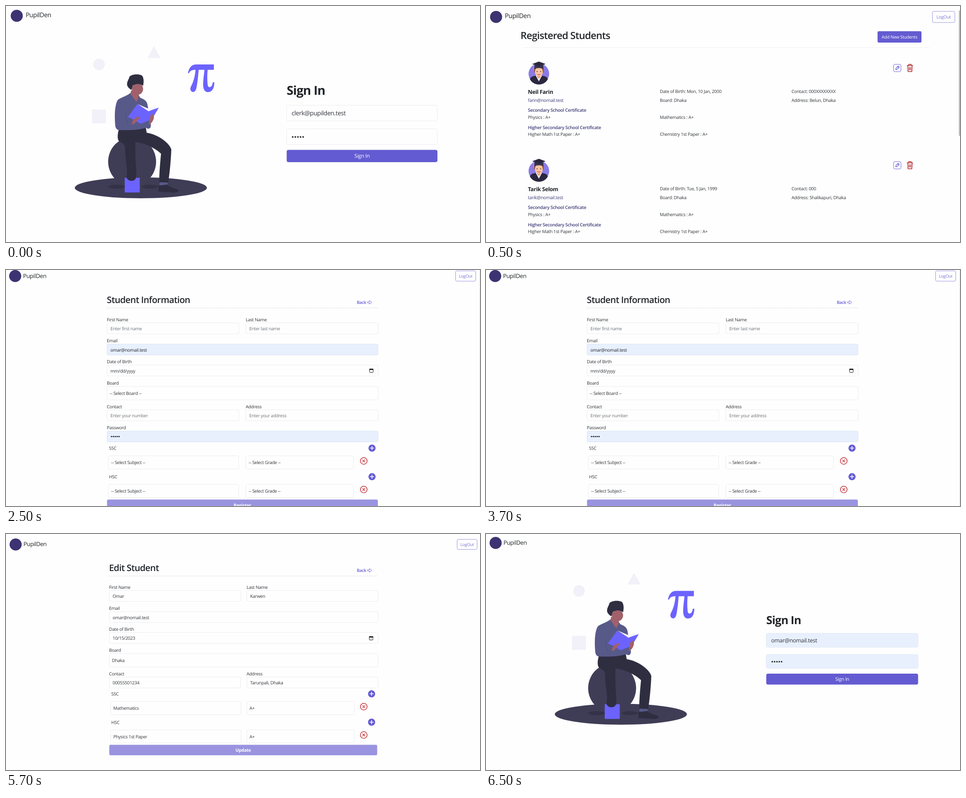
These frames come from a looping animation (1058 by 529 pixels, 8000 ms). An HTML page:

```html
<!DOCTYPE html>
<html lang="en">
<head>
<meta charset="utf-8">
<title>School admin tour</title>
<style>
  html, body { margin: 0; width: 100%; height: 100%; overflow: hidden; background: #fefefe; }
  svg { display: block; width: 1058px; height: 529px; }
  text { font-family: "Open Sans", "Noto Sans", sans-serif; letter-spacing: -.03em; white-space: pre; text-rendering: geometricPrecision; }
</style>
</head>
<body>
<svg id="stage" viewBox="0 0 1058 529"></svg>
<script>
const INK = '#212529', BODY = '#33363b', HINT = '#6c7279', NAVY = '#3f3d78',
      VIOLET = '#635bd1', PALE = '#9a94e0', FILLED = '#e8f0fe', EDGE = '#ececf0', RED = '#c43a3f';

// Drawing helpers: each returns SVG markup.
const text = (x, y, size, str, fill = BODY, weight = 400, anchor = 'start') =>
  `<text x="${x}" y="${y}" font-size="${size}" fill="${fill}" font-weight="${weight}" text-anchor="${anchor}">${str}</text>`;
const rect = (x, y, w, h, fill, stroke = 'none', r = 3) =>
  `<rect x="${x}" y="${y}" width="${w}" height="${h}" rx="${r}" fill="${fill}" stroke="${stroke}"/>`;
const circle = (x, y, r, fill, extra = '') => `<circle cx="${x}" cy="${y}" r="${r}" fill="${fill}" ${extra}/>`;
const ellipse = (x, y, rx, ry, fill) => `<ellipse cx="${x}" cy="${y}" rx="${rx}" ry="${ry}" fill="${fill}"/>`;
const path = (d, fill) => `<path d="${d}" fill="${fill}"/>`;
const line = (d, stroke, width = 1, extra = '') =>
  `<path d="${d}" fill="none" stroke="${stroke}" stroke-width="${width}" stroke-linecap="round" stroke-linejoin="round" ${extra}/>`;
const group = (x, y, body) => `<g transform="translate(${x} ${y})">${body}</g>`;
const dots = (x, y, step, r) => [0, 1, 2, 3, 4].map(i => circle(x + i * step, y, r, INK)).join('');

const brand = (cx, cy, x, y, size) => circle(cx, cy, 13.5, '#3c3372') + text(x, y, size, 'PupilDen', INK);
const logout = (x, y, w, h, size) =>
  rect(x, y, w, h, 'none', '#9a94e0') + text(x + w / 2, y + h / 2 + 3.5, size, 'LogOut', '#7a73d4', 400, 'middle');

function reader() {
  const dark = '#2f2e41', slate = '#3f3d56', cloth = '#575a89', skin = '#a0616a', blue = '#6c63ff', faint = '#f2f0f8';
  return circle(207.5, 131, 13, faint) + path('M330.5 90L345 116.5H316Z', faint) + rect(192, 232, 31, 31, faint, 'none', 0) +
    path('M406 150C409 137 415 131 424 131H464V143H450C449 155 449 166 450 176C451 182 454 183 457 181C460 179 461 175 461.5 171H465C465 184 460 193 451 193C443 193 440 186 440 176C440 165 442 154 443 143H430C429 158 427 174 425 184C423 192 419 194 415 192C410 189 411 183 414 178C419 168 422 156 423 143C415 143 411 145 408 151Z', blue) +
    ellipse(301, 407.5, 147.5, 23.5, slate) + ellipse(281.5, 349, 53.5, 55, slate) +
    ellipse(247, 405, 19, 4.5, '#343247') + ellipse(321, 405, 18, 4.5, '#343247') +
    rect(265, 385, 33.5, 33, blue, 'none', 0) +
    path('M252 276C248 290 248 302 255 305C262 308 266 312 266 320C265 345 273 365 269 383C270 394 288 395 290 385C293 372 287 345 289 305C305 306 330 316 346 331C344 352 342 375 342 395L362 396C366 370 368 345 369 322C366 308 340 288 314 284L312 272Z', dark) +
    path('M343 395L362 396L358 403L342 402Z', cloth) +
    path('M340 401C350 404 356 398 362 402C369 408 379 408 386 413C384 418 376 419 370 418L340 416Z', dark) +
    path('M279 194C268 203 256 205 250 210C242 221 242 250 244 269C245 276 250 279 255 278C275 279 295 278 313 273C319 278 325 273 323 264L316 222C315 212 306 208 300 206L295 198Z', cloth) +
    line('M268 240C266 250 270 260 273 268', '#4b4d7a') +
    path('M279 189L297 194L296 205L291 215L278 197Z', skin) + ellipse(293.5, 186, 12.5, 13, skin) +
    path('M270.5 178C269 170 274 165 275 160C277 152 302 151 305 158C308 164 307.5 172 306 179C298 173 290 174 283 178L280 188C276 186 272 182 270.5 178Z', dark) +
    path('M293 220L318 235L341 228L328 250C326 256 322 258 318 257L301 264C290 259 282 252 272 249Z', blue) +
    path('M294 220L320 231C326 226 332 225 339 228L318 236Z', '#f4f3fa') +
    path('M281 265C281 256 289 248 297 248C298 254 293 257 285 265Z', skin) +
    path('M319 264L321 250C325 240 329 242 330 247C331 254 326 261 321 266Z', skin);
}

// Sign-in form; y values are [title, first box, second box, button].
function signIn(x, w, [title, first, second, button], boxH, btnH, size, mail, bg, step) {
  const edge = bg === 'none' ? EDGE : '#e3e9f5';
  return text(x, title, size * 1.98, 'Sign In', INK, 700) +
    rect(x, first, w, boxH, bg, edge, 4) + text(x + 11, first + boxH / 2 + 5, size, mail) +
    rect(x, second, w, boxH, bg, edge, 4) + dots(x + 13.5, second + boxH / 2 + .5, step, step * .32) +
    rect(x, button, w, btnH, VIOLET, 'none', 4) +
    text(x + w / 2, button + btnH / 2 + 4, size * .85, 'Sign In', '#fff', 400, 'middle');
}

const avatar = () => circle(0, 0, 23, '#8a7be6') +
  path('M-20 12C-17 4 -10 5 0 4C10 5 17 4 20 12C16 20 8 24 0 24S-16 20 -20 12Z', '#2c2740') +
  path('M-7 4L0 17L7 4Z', '#f6f2f4') + path('M-4 2H4V7L0 11L-4 7Z', '#e5a27f') +
  path('M-10.5 -3V-13H10.5V-3Z', '#8a4836') + ellipse(0, -4.5, 9, 10.5, '#f8c4a2') +
  circle(-4, -5, 1.1, '#3a2a33') + circle(4, -5, 1.1, '#3a2a33') + line('M-3 1Q0 3.5 3 1', '#b5483f', 1.4) +
  path('M-10 -19V-11Q0 -15 10 -11V-19Z', '#3a3350') + path('M-15 -22L0 -27.5L15 -22L0 -16Z', '#2c2740') +
  line('M-12 -21V-8', '#e2a24c', 1.3);

const pencil = () => rect(.8, .8, 16.4, 16.4, 'none', '#6a62d6', 3) +
  line('M5.5 12.5L6 9.5L11 4.5L13.5 7L8.5 12Z M9.5 6L12 8.5', '#6a62d6', 1.3);
const trash = () => line('M.5 3.5H13M4 3V.8H9.5V3M2 4L2.6 17H11L11.6 4M5.3 7.5V13.5M8.3 7.5V13.5', '#b02a30', 1.6);

function student(dy, name, mail, birth, contact, address) {
  const cell = (x, y, str) => text(x, y, 10, str);
  const head = (y, str) => text(93.5, y, 10.1, str, NAVY, 600);
  return group(0, dy, group(118, 152, avatar()) + group(909, 130, pencil()) + group(939.5, 130, trash()) +
    text(93.5, 197, 12.4, name, INK, 700) + text(93.5, 214.5, 10.2, mail, NAVY) +
    cell(388, 194.5, 'Date of Birth: ' + birth) + cell(388, 214.5, 'Board: Dhaka') +
    cell(682, 194.5, 'Contact: ' + contact) + cell(682, 214.5, 'Address: ' + address + ', Dhaka') +
    head(237, 'Secondary School Certificate') + cell(93.5, 252.5, 'Physics : A+') + cell(388, 252.5, 'Mathematics : A+') +
    head(275.5, 'Higher Secondary School Certificate') + cell(93.5, 290.5, 'Higher Math 1st Paper : A+') +
    cell(388, 290.5, 'Chemistry 1st Paper : A+'));
}

// Labelled input; y is the baseline of the label.
const field = (label, x, y, w, value, color = BODY, bg = 'none') =>
  text(x, y, 10, label) + rect(x + .5, y + 4, w, 24.5, bg, bg === 'none' ? EDGE : '#dbe5f6') + text(x + 8, y + 20.5, 10, value, color);
const board = (x, y, w, value) =>
  text(x, y, 10, 'Board') + rect(x + .5, y + 4.5, w, 30, 'none', EDGE) + text(x + 6.5, y + 23, 10, value);
const calendar = (x, y) => rect(x, y + 1, 8, 7.5, 'none', '#111', 1) + rect(x - .5, y + .5, 9, 2.5, '#111', 'none', 0);
const heading = (x, y, title) => text(x, y, 20, title, INK, 600) +
  text(783, y + 2, 9.6, 'Back', VIOLET, 600) +
  line(`M807.5 ${y - 3}H811.5V${y - 5.5}L816.5 ${y - 1.5}L811.5 ${y + 2.5}V${y}H807.5Z`, VIOLET, .9) +
  line(`M${x} ${y + 11}H830`, '#dcdce2', 1, 'stroke-dasharray="2 2"');

function marks(label, x, y, x2, plusX, subject, grade) {
  return text(x + 5, y, 10, label) + circle(plusX, y - 3.7, 8, VIOLET) +
    line(`M${plusX - 4} ${y - 3.7}h8M${plusX} ${y - 7.7}v8`, '#fff', 1.6) +
    rect(x + 3.5, y + 13.5, 291, 29.5, 'none', EDGE) + text(x + 9.5, y + 32, 10, subject) +
    rect(x2 + .5, y + 13.5, 240, 29.5, 'none', EDGE) + text(x2 + 6.5, y + 32, 10, grade) +
    circle(798.5, y + 25, 7.5, 'none', `stroke="${RED}" stroke-width="1.6"`) +
    line(`M796 ${y + 22.5}l5 5m0 -5l-5 5`, RED, 1.6);
}

const screens = [
  { end: 500, body: brand(24, 22, 44, 25, 14.2) + reader() +
    signIn(626.5, 336.5, [199, 222.5, 275.5, 322.5], 35, 27.5, 13.9, 'clerk@pupilden.test', 'none', 5.8) },

  { end: 2500, body: brand(22.5, 24.5, 42, 27, 14.4) + logout(996.5, 12, 50, 25, 9.9) +
    text(77, 74, 22, 'Registered Students', INK, 600) +
    rect(874, 56.5, 98, 25.5, VIOLET) + text(923, 73, 9.85, 'Add New Students', '#fff', 400, 'middle') +
    line('M83 93.5H990', '#efeff2') +
    student(0, 'Neil Farin', 'farin@nomail.test', 'Mon, 10 Jan, 2000', '000XXXXXXXX', 'Belun') +
    student(218, 'Tarik Selom', 'tarik@nomail.test', 'Tue, 5 Jan, 1999', '000', 'Shalikapuri') +
    rect(1055.5, 10, 2.5, 281, '#b9b9bc', 'none', 0) },

  { end: 4500, body: brand(20.5, 13.5, 38, 17.5, 13) + logout(1003.5, 2, 45, 23, 9.3) +
    heading(225, 74, 'Student Information') +
    field('First Name', 225, 114.5, 294.5, 'Enter first name', HINT) +
    field('Last Name', 535, 114.5, 295, 'Enter last name', HINT) +
    field('Email', 225, 162, 605, 'omar@nomail.test', INK, FILLED) +
    field('Date of Birth', 225, 209, 605, 'mm/dd/yyyy') + calendar(811.5, 221) +
    board(225, 256.5, 605, '-- Select Board --') +
    field('Contact', 225, 309.5, 294.5, 'Enter your number', HINT) +
    field('Address', 535, 309.5, 295, 'Enter your address', HINT) +
    field('Password', 225, 357, 605, '', INK, FILLED) + dots(235.5, 373.3, 4.2, 1.5) +
    marks('SSC', 225, 403, 535, 817, '-- Select Subject --', '-- Select Grade --') +
    marks('HSC', 225, 467, 535, 817, '-- Select Subject --', '-- Select Grade --') +
    rect(225.5, 514.5, 604.5, 24, PALE) + text(527.5, 530.5, 10.1, 'Register', '#fff', 700, 'middle') +
    line('M1057.5 0V529', '#e4e4e7') },

  { end: 6500, body: brand(21.5, 23.5, 39, 26.5, 12.9) + logout(1007, 12, 44.5, 22.5, 9.3) +
    heading(230, 83, 'Edit Student') +
    field('First Name', 230, 122.5, 293.5, 'Omar') + field('Last Name', 537, 122.5, 293, 'Karwen') +
    field('Email', 230, 170, 600, 'omar@nomail.test') +
    field('Date of Birth', 230, 216.5, 600, '10/15/2023') + calendar(811, 229) +
    board(230, 263.5, 600, 'Dhaka') +
    field('Contact', 230, 316.5, 293.5, '00055501234') + field('Address', 537, 316.5, 293, 'Tarunpali, Dhaka') +
    marks('SSC', 230, 362, 537, 816, 'Mathematics', 'A+') +
    marks('HSC', 230, 425.5, 537, 816, 'Physics 1st Paper', 'A+') +
    rect(230.5, 472.5, 598, 23.5, PALE) + text(529.5, 488, 9.9, 'Update', '#fff', 700, 'middle') },

  { end: 8000, body: brand(21.5, 20, 39, 23.5, 13) + group(0, -3.5, reader()) +
    signIn(625.5, 339, [202, 222.5, 270, 313], 31.5, 24.5, 12.6, 'omar@nomail.test', FILLED, 5.2) }
];

const stage = document.getElementById('stage');
stage.innerHTML = screens.map(s => `<g display="none">${s.body}</g>`).join('');
const layers = [...stage.children];
const start = performance.now();

function draw(now) {
  const t = Math.max(0, now - start) % 8000;
  const current = screens.findIndex(s => t < s.end);
  layers.forEach((g, i) => g.setAttribute('display', i === current ? 'inline' : 'none'));
  requestAnimationFrame(draw);
}
draw(start);
</script>
</body>
</html>
```
